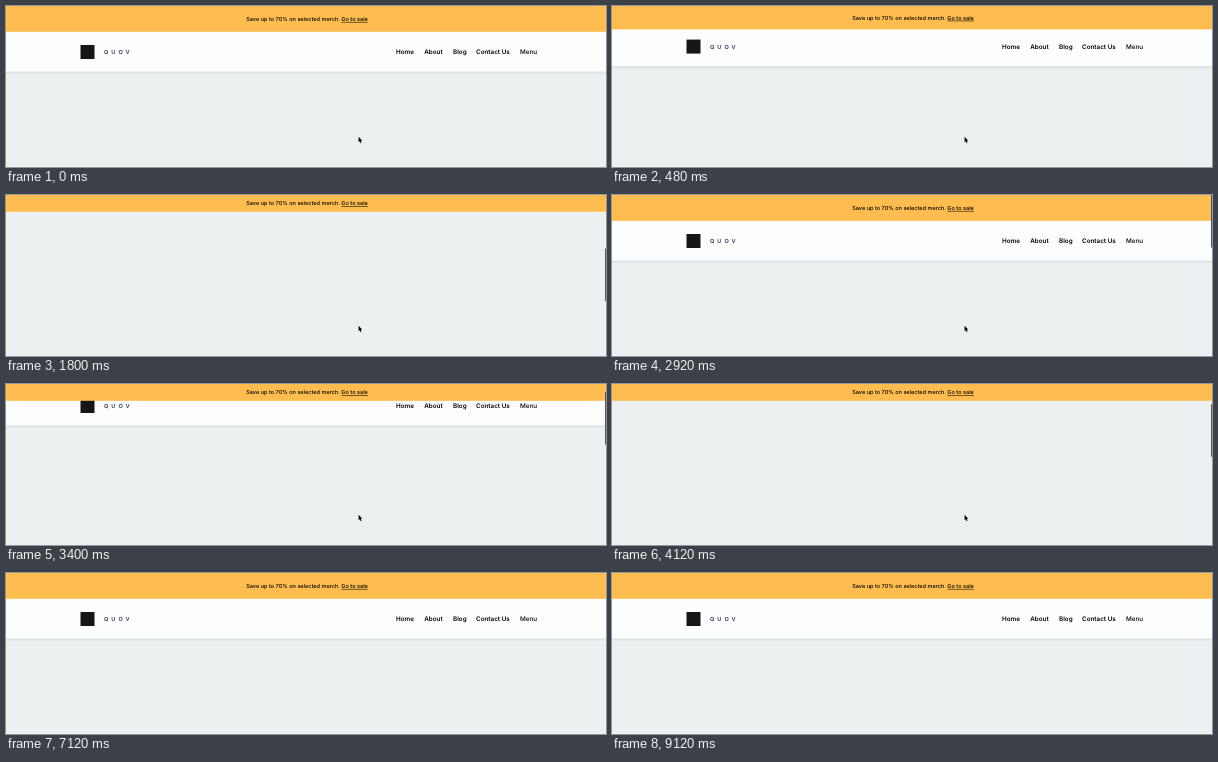
Recreate the animation shown at these times as an HTML page. Size 600 by 161 pixels, loop 10 s.

```html
<!DOCTYPE html>
<html lang="en">
<head>
<meta charset="utf-8">
<title>Shrinking sale banner</title>
<style>
  html, body { margin: 0; width: 100%; height: 100%; overflow: hidden; background: #ecf0f1; }
  svg { display: block; font-family: Inter, "Open Sans", sans-serif; text-rendering: geometricPrecision; }
  .nav { font-size: 6.3px; font-weight: 600; }
  .nav .light { font-weight: 500; }
  .brand { font-size: 5.6px; font-weight: 600; letter-spacing: 3px; fill: #34365a; }
  .offer { font-size: 5.55px; font-weight: 500; }
  .offer tspan { text-decoration: underline .5px; text-underline-offset: .7px; }
  #header { filter: drop-shadow(0 1px 1.2px rgba(40, 60, 70, .14)); }
</style>
</head>
<body>
<svg width="600" height="161">
  <rect width="600" height="161" fill="#ecf0f1"/>
  <g id="header">
    <rect x="-5" y="16" width="610" height="49.6" fill="#fdfdfd"/>
    <rect x="74.5" y="39" width="14" height="14" fill="#161616"/>
    <text class="brand" x="98" y="48.1">QUOV</text>
    <g class="nav">
      <text x="390" y="48.2">Home</text>
      <text x="418.2" y="48.2">About</text>
      <text x="447" y="48.2">Blog</text>
      <text x="470" y="48.2">Contact Us</text>
      <text class="light" x="514" y="48.2">Menu</text>
    </g>
  </g>
  <rect id="banner" width="600" fill="#ffbd50"/>
  <text id="offer" class="offer" x="240.2" y="14.9">Save up to 70% on selected merch. <tspan>Go to sale</tspan></text>
  <rect id="thumb" x="599" width="1" height="52.5" fill="#505253"/>
  <path id="cursor" d="M352.6 130.7v5.6l1.2-1.1.8 2 .9-.4-.8-2h1.6z" stroke="#fff" stroke-width=".4" paint-order="stroke"/>
</svg>
<script>
  const LOOP = 10000, TICK = 40, MAX_SCROLL = 322, THUMB_TRAVEL = 108.5;
  const BANNER = 25.8, SHRINK = 9, SHRINK_RANGE = 20;

  // Eased scroll gestures: start ms, end ms, distance
  const gestures = [
    [260, 1290, 50], [1290, 2460, 272], [2480, 2920, -322],
    [3300, 3840, 292], [3840, 4240, -292],
    [4640, 4880, 322], [5040, 5480, -322]
  ];

  const [header, banner, offer, thumb, cursor] =
    ["header", "banner", "offer", "thumb", "cursor"].map(id => document.getElementById(id));
  const clamp = v => Math.min(1, Math.max(0, v));
  const ease = v => (1 - Math.cos(Math.PI * clamp(v))) / 2;
  const scrollAt = t => gestures.reduce(
    (sum, [start, end, distance]) => sum + distance * ease((t - start) / (end - start)), 0);

  function draw(now) {
    const t = Math.floor(now % LOOP / TICK) * TICK;
    const scroll = scrollAt(t);
    const shrink = SHRINK * clamp(scroll / SHRINK_RANGE);

    header.setAttribute("transform", `translate(0 ${-scroll})`);
    banner.setAttribute("height", BANNER - shrink);
    offer.setAttribute("transform", `translate(0 ${-shrink / 2})`);
    thumb.setAttribute("y", scroll / MAX_SCROLL * THUMB_TRAVEL);
    thumb.setAttribute("opacity", t < 1280 ? 0 : clamp((6120 - t) / 200));
    cursor.setAttribute("opacity", t < 6000 ? 1 : 0);
    requestAnimationFrame(draw);
  }
  requestAnimationFrame(draw);
</script>
</body>
</html>
```
